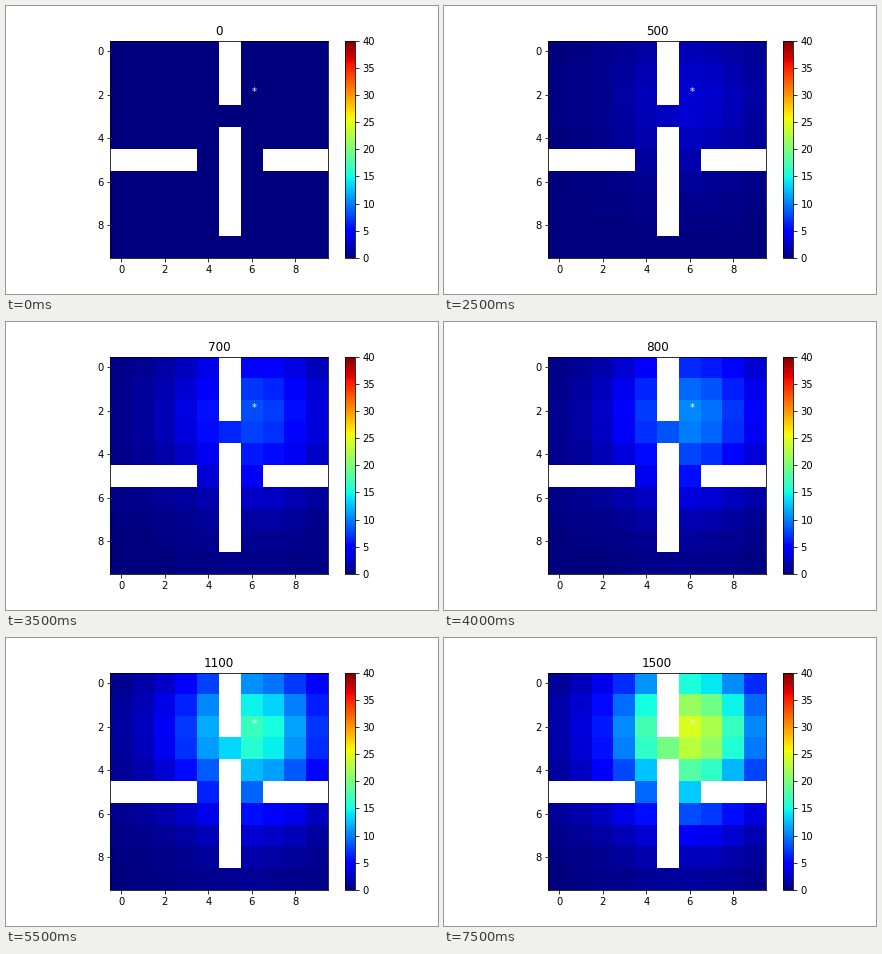
Write a matplotlib script that moves like this. It is 432 by 288 pixels and loops after 8 s.

```python
import numpy as np
import matplotlib.pyplot as plt
from matplotlib.animation import FuncAnimation

FRAMES, STEP, SIZE = 16, 100, 10
START = 3  # last step before learning shows


def final_values():
    row, col = np.mgrid[:SIZE, :SIZE].astype(float)
    left, top = col < 5, row < 5

    # horizontal fade away from the dividing wall
    d = np.where(left, 4 - col, col - 6)
    fade_left = np.where(top, np.exp(-0.45 * d - 0.035 * d**2),
                         np.exp(-0.42 * d))
    across = np.where(left, fade_left, np.exp(-0.095 * d**2))

    # bell around the goal row above, geometric decay below
    down = np.where(top, np.exp(-0.095 * (row - 2.2)**2), 0.53**(row - 6))
    peak = np.where(top, np.where(left, 17.3, 24.5),
                    np.where(left, 5.6, 8.0))
    v = peak * across * down

    # walls, then doorways as the mean of their two sides
    v[:, 5] = v[5, :] = np.nan
    for r in (3, 9):
        v[r, 5] = (v[r, 4] + v[r, 6]) / 2
    for c in (4, 6):
        v[5, c] = (v[4, c] + v[6, c]) / 2
    return v


FINAL = final_values()


def growth(i):
    """Share of the final value: soft start, then nearly linear."""
    t = max(0, i - START) / (FRAMES - 1 - START)
    return t * (1.1 - 0.1 * t) * np.tanh(5 * t)


fig = plt.figure(figsize=(6, 4), dpi=72, facecolor="white")
fig.subplots_adjust(left=0.125, right=0.9, bottom=0.125, top=0.88)
ax = fig.add_subplot()
grid = ax.imshow(FINAL * growth(0), cmap="jet", vmin=0, vmax=40,
                 interpolation="nearest")
fig.colorbar(grid, ax=ax)
ax.set_xticks(range(0, SIZE, 2))
ax.set_yticks(range(0, SIZE, 2))
ax.text(6, 2, "*", color="white")
title = ax.set_title("0")


def update(i):
    grid.set_data(FINAL * growth(i))
    title.set_text(str(i * STEP))
    return grid, title


anim = FuncAnimation(fig, update, frames=FRAMES, interval=500,
                     repeat=True, repeat_delay=0)
plt.show()
```
